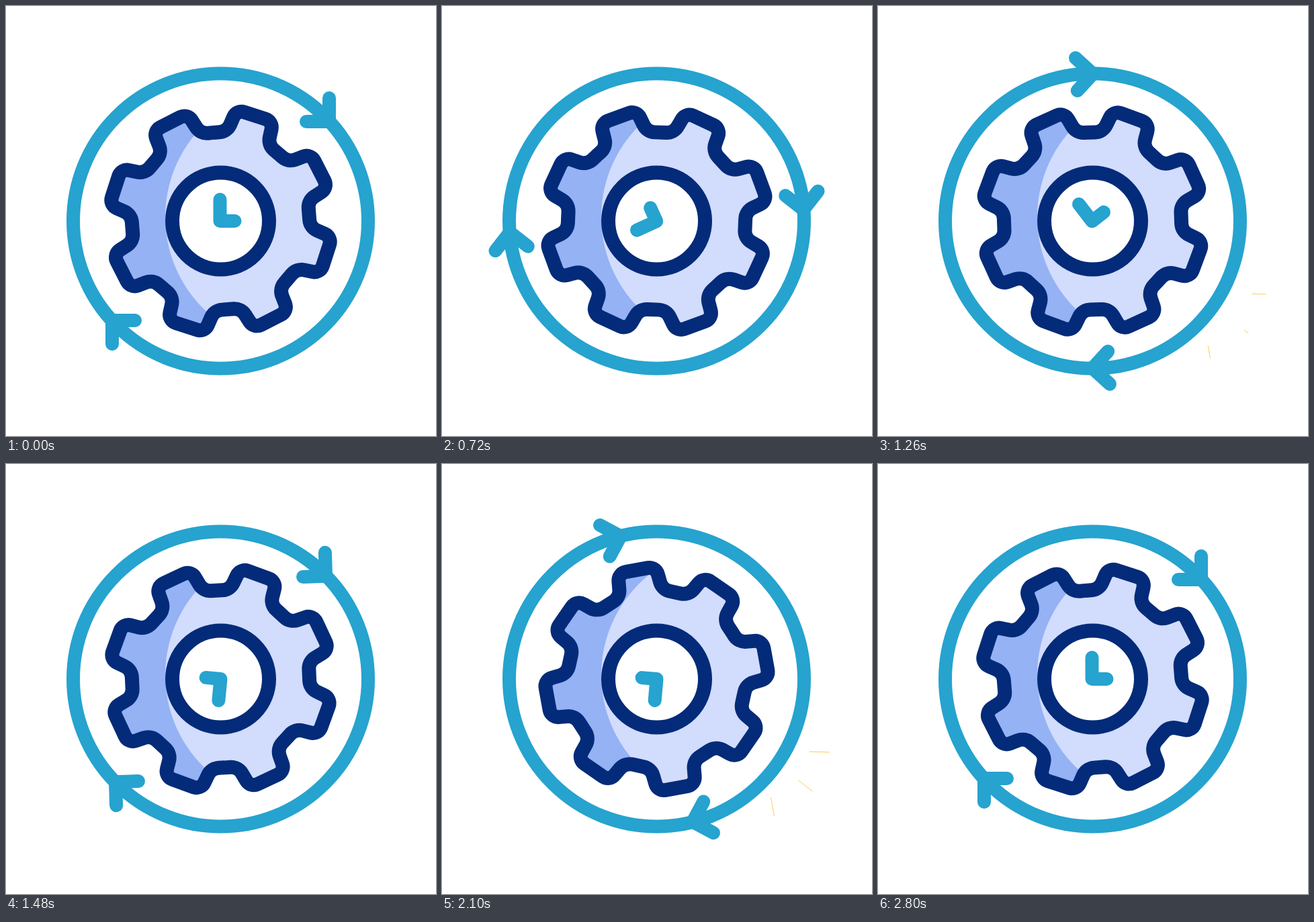
These frames come from a looping animation (640x640 px, 3260 ms). An HTML page with a canvas:

```html
<!DOCTYPE html>
<html>
<head>
<meta charset="utf-8">
<style>
  html, body { margin: 0; height: 100%; overflow: hidden; background: #fff; }
  canvas { display: block; }
</style>
</head>
<body>
<canvas id="stage" width="640" height="640"></canvas>
<script>
const ctx = document.getElementById('stage').getContext('2d');
const TEAL = '#26a3cf', NAVY = '#032b79', LIGHT = '#d2dcfd', SHADE = '#94b2f4', YELLOW = '#ffcb4f';
const CX = 319.5, CY = 320, LOOP = 3260, TAU = Math.PI * 2, TEETH = 8;

// Smooth 0..1 progress of a move that begins at `start` and lasts `span` ms
function ease(time, start, span) {
  const t = Math.min(1, Math.max(0, (time - start) / span));
  return t * t * (3 - 2 * t);
}

function makeGear() {
  const path = new Path2D();
  const at = (tooth, u, v) => {
    const a = tooth * TAU / TEETH + Math.PI / 10;
    return [u * Math.sin(a) + v * Math.cos(a), v * Math.sin(a) - u * Math.cos(a)];
  };
  path.moveTo(...at(-0.5, 132, 0));
  for (let i = 0; i < TEETH; i++) {
    const corners = [[129.5, -32, 19], [165, -28.5, 13], [165, 28.5, 13], [129.5, 32, 19]]
      .map(([u, v, r]) => [...at(i, u, v), r]);
    corners.forEach(([x, y, r], k) => {
      const next = corners[k + 1] || at(i + 1, 129.5, -32);
      path.arcTo(x, y, next[0], next[1], r);
    });
  }
  path.closePath();
  return path;
}
const gear = makeGear();

function line(color, ...points) {
  ctx.strokeStyle = color;
  ctx.beginPath();
  points.forEach(([x, y]) => ctx.lineTo(x, y));
  ctx.stroke();
}

function disc(x, y, r) {
  ctx.beginPath();
  ctx.arc(x, y, r, 0, TAU);
}

function turned(angle, draw) {
  ctx.save();
  ctx.rotate(angle);
  draw();
  ctx.restore();
}

function drawGear(angle) {
  ctx.save();
  ctx.rotate(angle);
  ctx.clip(gear);
  ctx.rotate(-angle);
  ctx.fillStyle = SHADE;
  ctx.fillRect(-200, -200, 400, 400);
  ctx.fillStyle = LIGHT;
  disc(109.5, -6, 192);
  ctx.fill();
  ctx.restore();

  ctx.lineWidth = 21;
  ctx.strokeStyle = NAVY;
  turned(angle, () => ctx.stroke(gear));
  disc(0, 0, 72);
  ctx.fillStyle = '#fff';
  ctx.fill();
  ctx.stroke();
}

// Each spark: start point, end point, delay
const sparks = [
  [546.5, 428, 577, 429, 60],
  [520, 462.5, 551, 487, 0],
  [489.5, 496, 494.5, 524, 60]
];

function drawSparks(time, start) {
  for (const [x1, y1, x2, y2, delay] of sparks) {
    const head = ease(time, start + delay, 180);
    const tail = ease(time, start + delay + 160, 180);
    const point = p => [x1 + (x2 - x1) * p, y1 + (y2 - y1) * p];
    if (head > 0 && tail < 1) line(YELLOW, point(tail), point(head));
  }
}

function draw(now) {
  const time = now % LOOP;
  const turn = ease(time, 200, 2580) * TAU;

  ctx.fillStyle = '#fff';
  ctx.fillRect(0, 0, 640, 640);
  ctx.lineCap = ctx.lineJoin = 'round';

  ctx.save();
  ctx.translate(CX, CY);
  drawGear(-turn);

  ctx.lineWidth = 20;
  ctx.strokeStyle = TEAL;
  disc(0, 0, 219.5);
  ctx.stroke();
  for (const half of [0, Math.PI]) {
    turned(turn + half, () => line(TEAL, [127.5, -148], [161.5, -148], [161.5, -183]));
  }
  ctx.translate(-0.5, 0);
  turned(-3 * turn, () => line(TEAL, [-0.5, -32], [-0.5, 0], [21.5, 0]));
  ctx.restore();

  drawSparks(time, 970);
  drawSparks(time, 1870);
  requestAnimationFrame(draw);
}
requestAnimationFrame(draw);
</script>
</body>
</html>
```
